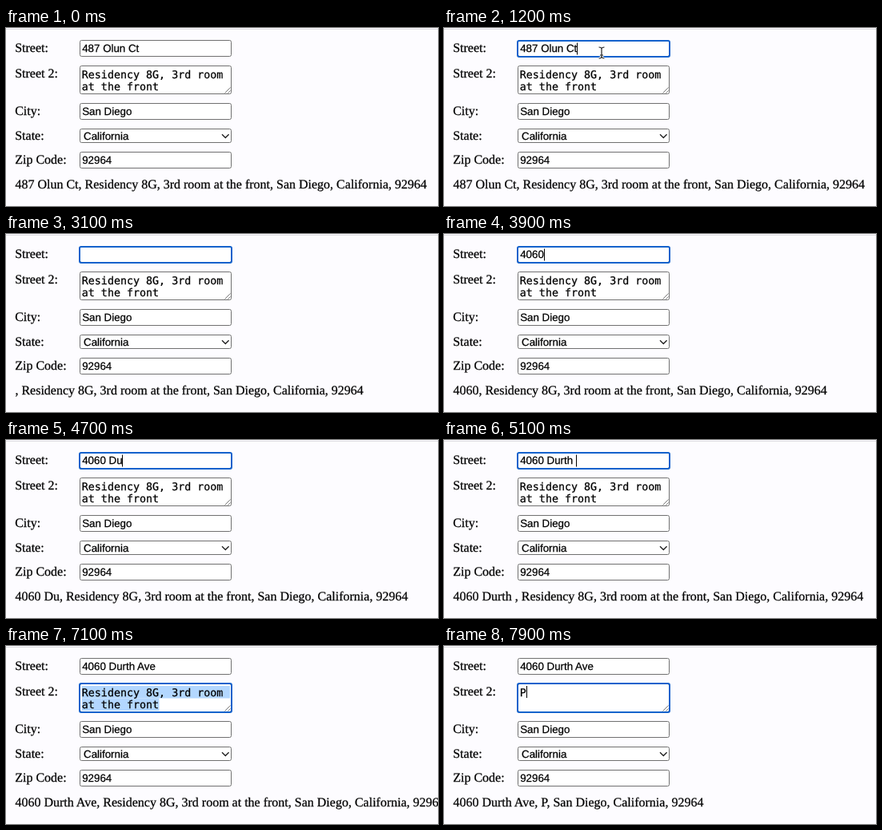
An HTML page for the animation above (8 s loop, 540 by 223 pixels).

```html
<!DOCTYPE html>
<html lang="en">
<head>
<meta charset="utf-8">
<title>Address form</title>
<style>
  html, body { margin: 0; width: 100%; height: 100%; overflow: hidden; background: #fdfcff; }
  svg { display: block; width: 540px; height: 223px; }
  text { white-space: pre; fill: #000; stroke: #000; stroke-width: .25; text-rendering: geometricPrecision; }
  .label { font: 16px "Liberation Serif", Times, serif; }
  .value { font: 13.333px "Liberation Sans", Arial, sans-serif; }
  .mono { font: 13.333px "DejaVu Sans Mono", monospace; }
  .box { fill: #fff; stroke: #707070; }
  .ring { fill: none; stroke: #1462cc; stroke-width: 2; }
  .select { fill: #b3d7ff; }
  .line { fill: none; stroke: #555; }
</style>
</head>
<body>
<svg id="stage" viewBox="0 0 540 223" xmlns="http://www.w3.org/2000/svg"></svg>
<script>
const LOOP = 8000;
const stage = document.getElementById("stage");

function add(tag, attrs, content = "") {
  const node = document.createElementNS("http://www.w3.org/2000/svg", tag);
  for (const key in attrs) node.setAttribute(key, attrs[key]);
  node.textContent = content;
  return stage.appendChild(node);
}
const write = (cls, x, y, content) => add("text", { class: cls, x, y }, content);
const frame = (cls, y, h, inset = 0.5) => add("rect", {
  class: cls, x: 92 + inset, y: y + inset, width: 190 - 2 * inset, height: h - 2 * inset, rx: 2
});
const show = (node, on) => node.setAttribute("visibility", on ? "visible" : "hidden");

// Static form
add("rect", { y: 1, width: 540, height: 1, fill: "#dddce1" });
[["Street:", 30], ["Street 2:", 62], ["City:", 109], ["State:", 140], ["Zip Code:", 169.5]]
  .forEach(([name, y]) => write("label", 11.2, y, name));
[[15, 21], [47, 36], [94, 21], [126, 18], [155, 21]].forEach(([y, h]) => frame("box", y, h));

const city = "San Diego", region = "California", zip = "92964";
write("value", 95.2, 109, city);
write("value", 97, 139.7, region);
write("value", 95.2, 170, zip);
add("path", { d: "M270 133.3l4.3 4.2 4.3-4.2", class: "line", style: "stroke:#222;stroke-width:1.4" });

// Moving parts
const marks = [[95, 50, 185], [95, 65.5, 96.5]].map(([x, y, width]) =>
  add("rect", { class: "select", x, y, width, height: 15.5 }));
const street = write("value", 95.2, 30, "");
const lines = [62.5, 78].map(y => write("mono", 94.8, y, ""));
add("path", { d: "M280.5 74.5l-7 7M280.5 78.5l-3 3", class: "line", style: "stroke-width:.8" });
const rings = [frame("ring", 16, 20, 0), frame("ring", 47, 36, 0)];
const caret = add("rect", { width: 1, height: 15 });
const output = write("label", 11.4, 201, "");
const arrow = add("path", {
  d: "M0 0V13.5L3.2 10.6 5.4 15.6 7.6 14.6 5.4 9.8H9.8Z", stroke: "#fff", "stroke-linejoin": "round"
});
const beamShape = "M-3.5-7Q0-7 0-4.5Q0-7 3.5-7M0-4.5V5M-3.5 7Q0 7 0 4.5Q0 7 3.5 7M-2 3H2";
const beam = [["#fff", 3], ["#222", 1.2]].map(([stroke, width]) =>
  add("path", { d: beamShape, fill: "none", stroke, "stroke-width": width }));

// Timed changes: [ms, changed state]
const oldStreet = "487 Olun Ct", newStreet = "4060 Durth Ave";
const steps = [
  [0, { street: oldStreet, extra: ["Residency 8G, 3rd room", "at the front"],
        focus: -1, caret: false, selected: false, pointer: null }],
  [100, { pointer: ["arrow", 428, 134] }],
  [300, { pointer: ["arrow", 325, 92] }],
  [400, { pointer: ["beam", 232, 60] }],
  [500, { pointer: ["beam", 197, 47], focus: 1, caret: true }],
  [700, { pointer: ["beam", 197, 40] }],
  [800, { pointer: ["beam", 197, 31], focus: 0 }],
  [1500, { pointer: null }],
  [3100, { caret: false }],
  [3600, { caret: true }],
  [6100, { caret: false }],
  [6200, { focus: 1, caret: true }],
  [6700, { caret: false }],
  [6900, { selected: true }],
  [7700, { selected: false, caret: true, extra: [""] }],
  [7900, { extra: ["P"] }]
];
const eraseAt = [1500, 1900, 2000, 2100, 2200, 2300, 2400, 2500, 2600, 2700, 2800];
const typeAt = [3600, 3700, 3800, 3900, 4200, 4500, 4700, 4800, 4900, 5000, 5100, 5200, 5500, 5600];
eraseAt.forEach((ms, i) => steps.push([ms, { street: oldStreet.slice(0, oldStreet.length - 1 - i) }]));
typeAt.forEach((ms, i) => steps.push([ms, { street: newStreet.slice(0, i + 1) }]));
steps.sort((a, b) => a[0] - b[0]);

function render(ms) {
  const s = {};
  for (const [at, change] of steps) if (at <= ms) Object.assign(s, change);

  street.textContent = s.street;
  lines.forEach((line, i) => line.textContent = s.extra[i] || "");
  output.textContent = [s.street, s.extra.join(" "), city, region, zip].join(", ");
  rings.forEach((ring, i) => show(ring, s.focus === i));
  marks.forEach(mark => show(mark, s.selected));

  const row = s.extra.length - 1;
  const host = s.focus === 1 ? lines[row] : street;
  const width = host.textContent ? host.getComputedTextLength() : 0;
  caret.setAttribute("x", Math.round(95 + width));
  caret.setAttribute("y", s.focus === 1 ? 50 + row * 15.5 : 18.5);
  show(caret, s.caret);

  const [kind, x, y] = s.pointer || [];
  show(arrow, kind === "arrow");
  beam.forEach(part => show(part, kind === "beam"));
  if (kind) [arrow, ...beam].forEach(part => part.setAttribute("transform", `translate(${x} ${y})`));
}

const start = performance.now();
let last = -1;
function tick() {
  const ms = Math.floor(((performance.now() - start) % LOOP) / 20) * 20;
  if (ms !== last) render(last = ms);
  requestAnimationFrame(tick);
}
tick();
</script>
</body>
</html>
```
